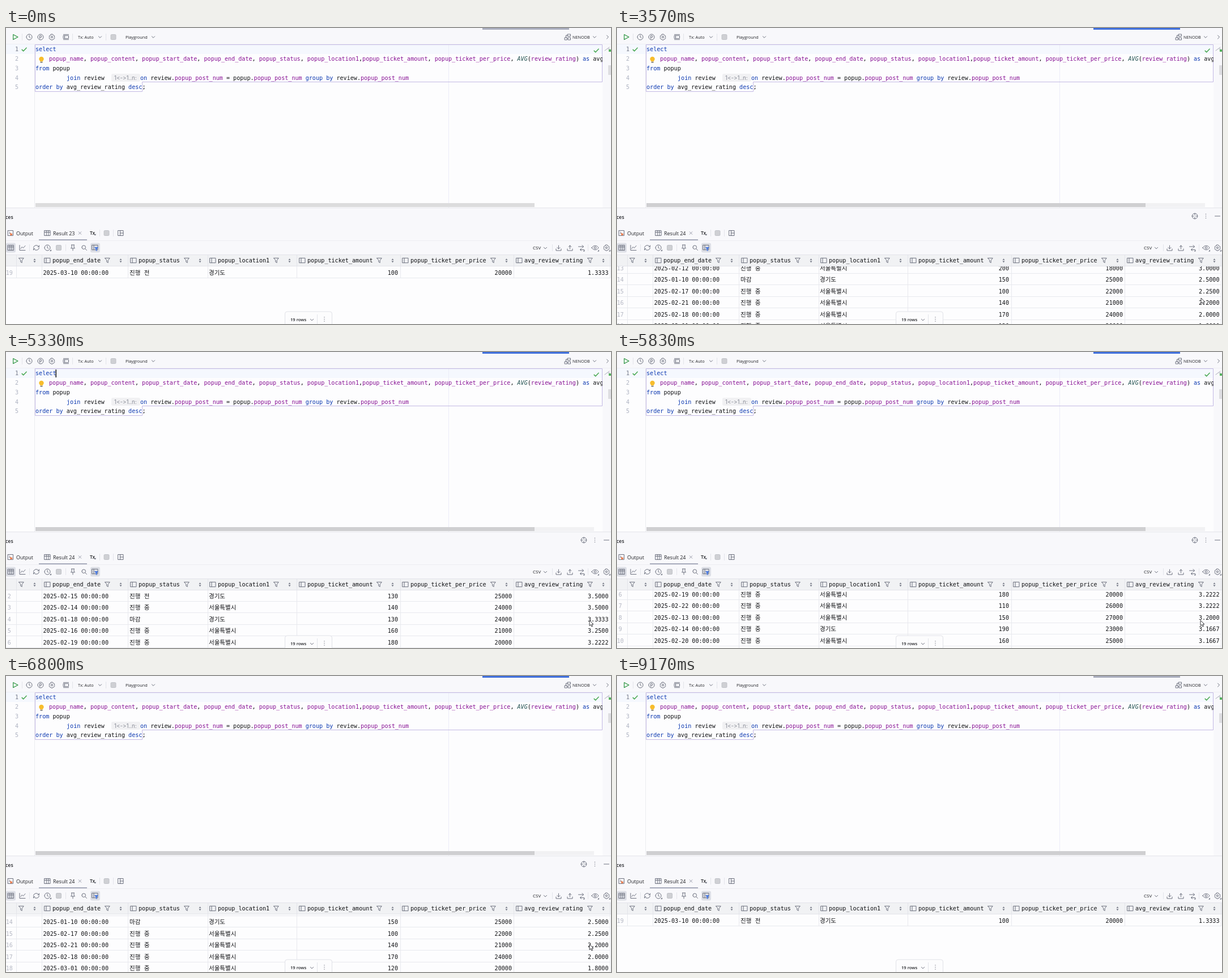
Write an HTML page that moves like this. It is 1068 px wide and 524 px high and loops after 9200 ms.

```html
<!DOCTYPE html>
<html lang="ko">
<head>
<meta charset="utf-8">
<title>SQL console</title>
<style>
html, body { margin: 0; width: 100%; height: 100%; overflow: hidden; background: #fdfdfe; }
svg { display: block; width: 1068px; height: 524px; }
text { white-space: pre; font: 10.1px "DejaVu Sans Mono", "Noto Sans CJK KR", "Noto Sans CJK", monospace; fill: #101114; }
.ui { font-family: "Open Sans", "Noto Sans", sans-serif; fill: #222327; }
.bold { font-weight: 600; }
.hint { font: 9.8px Inter, sans-serif; font-feature-settings: "calt" 0; fill: #8a8d98; }
.ko { font-size: 10.5px; }
.k { fill: #0a37b0; }
.c { fill: #871094; }
.f { fill: #20504f; font-style: italic; }
.i { fill: none; stroke: #6c707e; stroke-width: 1; stroke-linecap: round; stroke-linejoin: round; }
</style>
</head>
<body>
<svg id="stage" viewBox="0 0 1068 524"></svg>
<script>
const LOOP = 9200, PITCH = 20.55;

const rect = (x, y, w, h, fill, more = '') =>
  `<rect x="${x}" y="${y}" width="${w}" height="${h}" fill="${fill}" ${more}/>`;
const text = (x, y, s, more = '') => `<text x="${x}" y="${y}" ${more}>${s}</text>`;
const ui = (x, y, s, size, cls = '', more = '') =>
  text(x, y, s, `class="ui ${cls}" style="font-size:${size}px" ${more}`);
const icon = (x, y, d, more = '') =>
  `<path class="i" transform="translate(${x} ${y})" d="${d}" ${more}/>`;
const group = (id, body, more = '') => `<g id="${id}" ${more}>${body}</g>`;
const circle = (r, x = 0, y = 0) => `M${x - r} ${y}a${r} ${r} 0 1 0 ${2 * r} 0a${r} ${r} 0 1 0 ${-2 * r} 0`;
const stop = (x, y) => rect(x - 4.5, y - 4.5, 9, 9, '#cfd0d4', 'rx="1.5" stroke="#b9bbc2" stroke-width=".8"');
const vline = (x, y, h, color = '#e3e4ea') => rect(x, y, 1, h, color);

const shape = {
  clock: circle(5) + 'M0-3V0l2 1.4',
  param: circle(5) + 'M-1.3 3V-2.6H.4a1.6 1.6 0 0 1 0 3.3H-1.3',
  gear: 'M-1.4-5h2.8l.6 1.6 1.7.4 1.3 2-1 1.2 1 1.4-1.3 2-1.7.2-.6 1.3h-2.8l-.6-1.3-1.7-.2-1.3-2 1-1.4-1-1.2 1.3-2 1.7-.4z' + circle(1.6),
  frame: 'M-4.5-4.5h9M-4.5 4.5h9M-4.5-2.5h9v5h-9zM-2.5-2.5v5',
  down: 'M-2.6-1.2L0 1.4 2.6-1.2',
  right: 'M-1.5-3L1.5 0-1.5 3',
  grid: 'M-5-4.5h10v9h-10zM-5-1.5h10M-1.7-4.5v9M1.7-4.5v9',
  layout: 'M-4.5-4.5h9v9h-9zM-1-4.5v9M-1 0h5.5',
  chart: 'M-5-4.5v9h10M-3 1.5L-.7-1.5 1.3.5 5-3.5',
  refresh: 'M-5 0a5 4.5 0 0 1 9-2.5M5 0a5 4.5 0 0 1-9 2.5M5-4v2.3H2.6M-5 4V1.7h2.4',
  pin: 'M-2.5-5h5M-2-5v4l-1.5 2h7L2-1v-4M0 1v4',
  search: circle(3.3, -.8, -.8) + 'M1.7 1.7L4.5 4.5',
  load: 'M0-4.5V1.5M-2.5-1L0 1.5 2.5-1M-4.5 1.5v3h9v-3',
  send: 'M0 1.5V-4.5M-2.5-2L0-4.5 2.5-2M-4.5 1.5v3h9v-3',
  swap: 'M-5-2.5H4M1.5-5L4-2.5 1.5 0M5 3h-7M0 .8L-2 3 0 5',
  eye: 'M-6 0C-3-5 3-5 6 0 3 5-3 5-6 0z' + circle(1.9),
  column: 'M-5-4.2H5v8.4H-5zM-2-4.2v8.4',
  funnel: 'M-4.3-4.2h8.6L1.2-.2v4.2l-2.4-1.4V-.2z',
  nodes: 'M-5 1h4v4h-4zM1 1h4v4h-4zM0-5h5v3.5h-5zM-3 1v-4h3',
  check: 'M-3.8.3L-1.2 2.8 4-2.8',
  target: circle(4.8) + 'M0-4.8v3M0 4.8v-3M-4.8 0h3M4.8 0h-3'
};
const put = (name, x, y, more) => icon(x, y, shape[name], more);
const dots = (x, y) => [-3.5, 0, 3.5].map(d => rect(x - .7, y + d - .7, 1.4, 1.4, '#6c707e', 'rx=".7"')).join('');

const span = (cls, s) => `<tspan class="${cls}">${s}</tspan>`;
const k = s => span('k', s), c = s => span('c', s);

function topBar() {
  return rect(0, 0, 1068, 28, '#f8f8fb') +
    rect(841, 0, 153, 3, '#a9adbd', 'id="tab"') +
    rect(8, 7.5, 17, 17, '#e4e5ea', 'id="hover" rx="3"') +
    icon(17, 16, 'M-4.3-4.5L4 0-4.3 4.5z', 'style="stroke:#2f9444;fill:#f1fbf2;stroke-width:1.2"') +
    vline(28, 10, 12) + vline(117, 10, 12) + vline(176, 10, 12) +
    put('clock', 41, 16) + put('param', 61, 16) + put('gear', 81, 16) + put('frame', 106, 16) +
    ui(127, 19, 'Tx: Auto', 7.3) + put('down', 166, 16) + stop(189.5, 16) +
    ui(211, 19, 'Playground', 7.3) + put('down', 260, 16) +
    put('nodes', 991.5, 16) + ui(1000, 19, 'NENODB', 7.3) +
    put('down', 1039, 16) + put('right', 1062, 16);
}

function editor() {
  const names = ['name', 'content', 'start_date', 'end_date', 'status', 'location1', 'ticket_amount', 'ticket_per_price'];
  const cols = names.map(n => c('popup_' + n) + (n === 'location1' ? ',' : ', ')).join('');
  const post = c('popup_post_num');
  const line = n => Math.round(24.7 + 16.7 * n);
  let s = rect(0, 28, 1068, 290, '#fdfdfe') + rect(0, 29, 1053, 17, '#f5f8fe') +
    vline(50, 29, 289, '#ebecf0') + vline(781, 29, 289, '#ececf8') + rect(0, 28, 1068, 1, '#efeff3') +
    rect(1053, 29, 15, 289, '#f8f8fb');
  for (let n = 1; n < 6; n++)
    s += text(22, line(n), n, `text-anchor="end" style="fill:${n === 1 ? '#767a8a' : '#aeb3c2'}"`);
  s += put('check', 32, 38, 'style="stroke:#4dab57;stroke-width:1.6"') +
    '<path d="M51.5 29.5H1052.5V95.5H240.5V112.5H51.5z" fill="none" stroke="#c3b9e4"/>' +
    text(52, line(1), k('select')) +
    `<g clip-path="url(#code)">${text(76, line(2), cols + span('f', 'AVG') + '(' + c('review_rating') + ') ' + k('as') + ' avg_review_rating')}</g>` +
    text(52, line(3), k('from') + ' popup') +
    text(107, line(4), k('join') + ' review') +
    rect(186, 81, 51, 14, '#f1f1f3', 'rx="3"') +
    text(191, line(4) - .5, '1&lt;-&gt;1..n:', 'class="hint"') +
    text(237, line(4), `${k('on')} review.${post} = popup.${post} ${k('group by')} review.${post}`) +
    text(52, line(5), `${k('order by')} avg_review_rating ${k('desc')};`) +
    group('bulb', '<path d="M58.3 55a4.2 4.2 0 1 1 8.4 0c0 2-1.7 2.5-1.9 4.2h-4.6c-.2-1.7-1.9-2.2-1.9-4.2z" fill="#f7bd2c"/>' +
      rect(60.3, 59.8, 4.4, 1.8, '#77736a', 'rx=".8"')) +
    rect(87.5, 31, 1.5, 14, '#101114', 'id="caret"') +
    put('check', 1042, 40, 'style="stroke:#4dab57;stroke-width:1.6"') +
    icon(1061, 38, 'M-4 2L4-4M2-1l3 0', 'style="stroke:#a9adb8"') + rect(1064, 38, 4, 4, '#55b25e') +
    rect(1063, 66, 5, 17, '#dedee2') +
    rect(52, 310, 986, 7, '#f1f1f3', 'id="track"') + rect(52, 310, 881, 7, '#dcdcdd', 'id="bar"');
  return s;
}

function panel() {
  const sel = x => rect(x, 380.5, 17, 17, '#dddfe6', 'rx="3"');
  const corner = (x, y) => `<path d="M${x} ${y}h3v-3z" fill="#6c707e"/>`;
  return rect(0, 318, 1068, 84, '#f8f8fb') + rect(0, 318, 1068, 1, '#e4e5ea') +
    ui(-1, 338, 'ces', 8.8, 'bold') +
    group('tools', put('target', 1020, 333) + dots(1039.5, 333) + icon(1060, 333, 'M-4.5 0h9')) +
    icon(8, 363, 'M-4.5-4.5h9v9h-9zM-2.5-2l1.7 1.6-1.7 1.6') +
    '<path d="M7 362.5l5 2.5-4 3z" fill="#e4703f"/>' +
    ui(18, 366.5, 'Output', 9) + put('grid', 73, 363) +
    ui(83, 366.5, 'Result 23', 9, '', 'id="title"') +
    icon(130.5, 363, 'M-2.3-2.3l4.6 4.6M2.3-2.3l-4.6 4.6', 'style="stroke:#9a9dab"') +
    rect(58, 374, 85, 2, '#a9adbd') + rect(0, 376, 1068, 1, '#ececf1') +
    ui(148, 365.6, 'Tx', 8.4, 'bold') + corner(155.5, 367) +
    vline(165, 357, 12) + stop(177.5, 363) + vline(189, 357, 12) + put('layout', 202.5, 363) +
    sel(0) + sel(149) + put('grid', 8.5, 389) + put('chart', 29, 389) + vline(41, 383, 12) +
    put('refresh', 53.5, 389) + put('clock', 73, 389) + corner(77, 395) + stop(93, 389) + vline(105, 383, 12) +
    put('pin', 118, 389) + put('search', 138, 389) + put('column', 157, 388.5) +
    '<path transform="translate(159.5 391)" d="M-3.5-3h7L1 .5v3.5l-2-1V.5z" fill="#4878e0"/>' +
    ui(930, 392, 'CSV', 8) + put('down', 952, 389.5) + vline(964, 383, 12) +
    put('load', 975.5, 389.5) + put('send', 995.5, 389.5) + put('swap', 1015.5, 389.5) + corner(1018.5, 395.5) +
    vline(1027, 383, 12) + put('eye', 1040, 389) + corner(1044, 395.5) + put('gear', 1060, 389) + corner(1064, 395.5);
}

const heads = [['end_date', 82, 179], ['status', 234, 319], ['location1', 374, 477],
  ['ticket_amount', 532, 659], ['ticket_per_price', 714, 860], ['avg_review_rating', 915, 1031]];
const edges = [18, 63, 215, 356, 513, 696, 896, 1066];

function header() {
  const sort = x => `<path d="M${x - 2} 410.8h4l-2-2.6zM${x - 2} 412.6h4l-2 2.6z" fill="#6c707e"/>`;
  let s = rect(0, 402, 1068, 19, '#f1f2f4') + rect(0, 401, 1068, 1, '#e3e4ea') + rect(0, 421, 1068, 1, '#e3e4ea') +
    put('funnel', 27, 411.5) + sort(50.5);
  for (const [name, x, fx] of heads)
    s += put('column', x - 9, 411.5) + text(x, 415, (name.startsWith('avg') ? '' : 'popup_') + name) +
      put('funnel', fx, 411.5) + sort(fx + 23.5);
  for (const x of edges) s += vline(x, 402, 19, '#e3e4ea');
  return s;
}

// date | status | city | tickets | price in thousands | rating
const data = `02-11 b s 120 22 3.6667
02-15 a g 130 25 3.5000
02-14 b s 140 24 3.5000
01-18 c g 130 24 3.3333
02-16 b s 160 21 3.2500
02-19 b s 180 20 3.2222
02-22 b s 110 26 3.2222
02-13 b s 150 27 3.2000
02-14 b g 190 23 3.1667
02-20 b s 160 25 3.1667
02-12 b s 180 23 3.1667
02-25 b s 90 27 3.1111
02-12 b s 200 18 3.0000
01-10 c g 150 25 2.5000
02-17 b s 100 22 2.2500
02-21 b s 140 21 2.2000
02-18 b s 170 24 2.0000
03-01 b s 120 20 1.8000
03-10 a g 100 20 1.3333`.split('\n').map(r => r.split(' '));
const words = { a: '진행 전', b: '진행 중', c: '마감', s: '서울특별시', g: '경기도' };

function rows() {
  let s = '';
  data.forEach(([day, state, city, tickets, price, rating], n) => {
    const y = Math.round(432 + PITCH * n), base = y + 4, end = 'text-anchor="end"';
    s += text(5.7, base, n + 1, 'text-anchor="middle" style="fill:#b4b7c3"') +
      text(65.5, base, `2025-${day} 00:00:00`) +
      text(218, base, words[state], 'class="ko"') + text(358, base, words[city], 'class="ko"') +
      text(692, base, tickets, end) + text(893, base, price + '000', end) + text(1063.5, base, rating, end) +
      rect(0, y + 9, 1067, 1, '#e8e9ee');
  });
  for (const x of edges) s += vline(x, 421, PITCH * data.length, '#e8e9ee');
  return s;
}

function spinner() {
  let s = '';
  for (let i = 0; i < 8; i++)
    s += `<path d="M0-5V-9.5" transform="rotate(${i * 45})" stroke="#b4b6bd" stroke-width="2.6" stroke-linecap="round"/>`;
  return s;
}

const pill = '<path d="M492.5 525V506a4 4 0 0 1 4-4H571.5a4 4 0 0 1 4 4V525z" fill="#fcfcfd" stroke="#e1e2e8"/>' +
  ui(502, 519, '19 rows', 7.6, 'bold') + put('down', 540, 516.5) + vline(549, 507, 17) + dots(562, 515.5);

const stage = document.getElementById('stage');
stage.innerHTML =
  '<clipPath id="code"><rect x="51" y="46" width="1002" height="20"/></clipPath>' +
  '<clipPath id="body"><rect x="0" y="422" width="1068" height="102"/></clipPath>' +
  topBar() + editor() + panel() + rect(0, 402, 1068, 122, '#fdfdfe') +
  `<g clip-path="url(#body)">${group('rows', rows())}</g>` + header() +
  group('spin', spinner(), 'transform="translate(534 457)"') + pill +
  group('mouse', '<path d="M0 0V9.6L2.3 7.6 3.9 11.2 5.6 10.4 4 7H7z" fill="#fff" stroke="#24252a" stroke-width=".9" stroke-linejoin="round"/>');

const el = {};
for (const e of stage.querySelectorAll('[id]')) el[e.id] = e;

const mouseX = [[0, 330], [300, 330], [1250, 19], [2550, 19], [3050, 1031], [4200, 1031], [4700, 1030], [7700, 1030], [8250, 1005]];
const mouseY = [[0, 540], [300, 540], [1250, 16], [2550, 16], [3050, 478], [4200, 478], [4700, 475], [7700, 475], [8250, 540]];
const scroll = [[0, 369], [3150, 369], [4200, 83], [4550, 0], [5200, 0], [5330, 20.5], [6370, 198], [7330, 344], [7500, 369]];

function at(keys, t, ease = u => u) {
  const i = keys.findIndex(key => key[0] > t);
  if (i < 0) return keys[keys.length - 1][1];
  const [t0, a] = keys[i - 1], [t1, b] = keys[i];
  return a + (b - a) * ease((t - t0) / (t1 - t0));
}
const smooth = u => u * u * (3 - 2 * u);
const show = (e, on) => e.setAttribute('visibility', on ? 'visible' : 'hidden');

function draw(t) {
  const x = at(mouseX, t, smooth), y = at(mouseY, t, smooth);
  const focus = t >= 2000 && t < 8400;
  const inPanel = t > 2600 && y > 318 && y < 524;
  el.mouse.setAttribute('transform', `translate(${x} ${y})`);
  el.rows.setAttribute('transform', `translate(0 ${-Math.round(at(scroll, t))})`);
  el.tab.setAttribute('fill', focus ? '#3f6fdc' : '#a9adbd');
  el.bar.setAttribute('fill', t > 2900 ? '#cfcfd1' : '#dcdcdd');
  el.title.textContent = t < 2100 ? 'Result 23' : 'Result 24';
  show(el.hover, x < 25 && y < 25);
  show(el.caret, focus && t % 1000 < 500);
  show(el.bulb, t < 2000 || t > 2900);
  show(el.track, inPanel);
  show(el.tools, inPanel);
  show(el.spin, t >= 2100 && t < 2600);
  const step = Math.floor(t / 90) % 8;
  [...el.spin.children].forEach((p, i) => p.setAttribute('opacity', 1 - .08 * ((step - i + 8) % 8)));
}

function tick() {
  draw(performance.now() % LOOP);
  requestAnimationFrame(tick);
}
tick();
</script>
</body>
</html>
```
